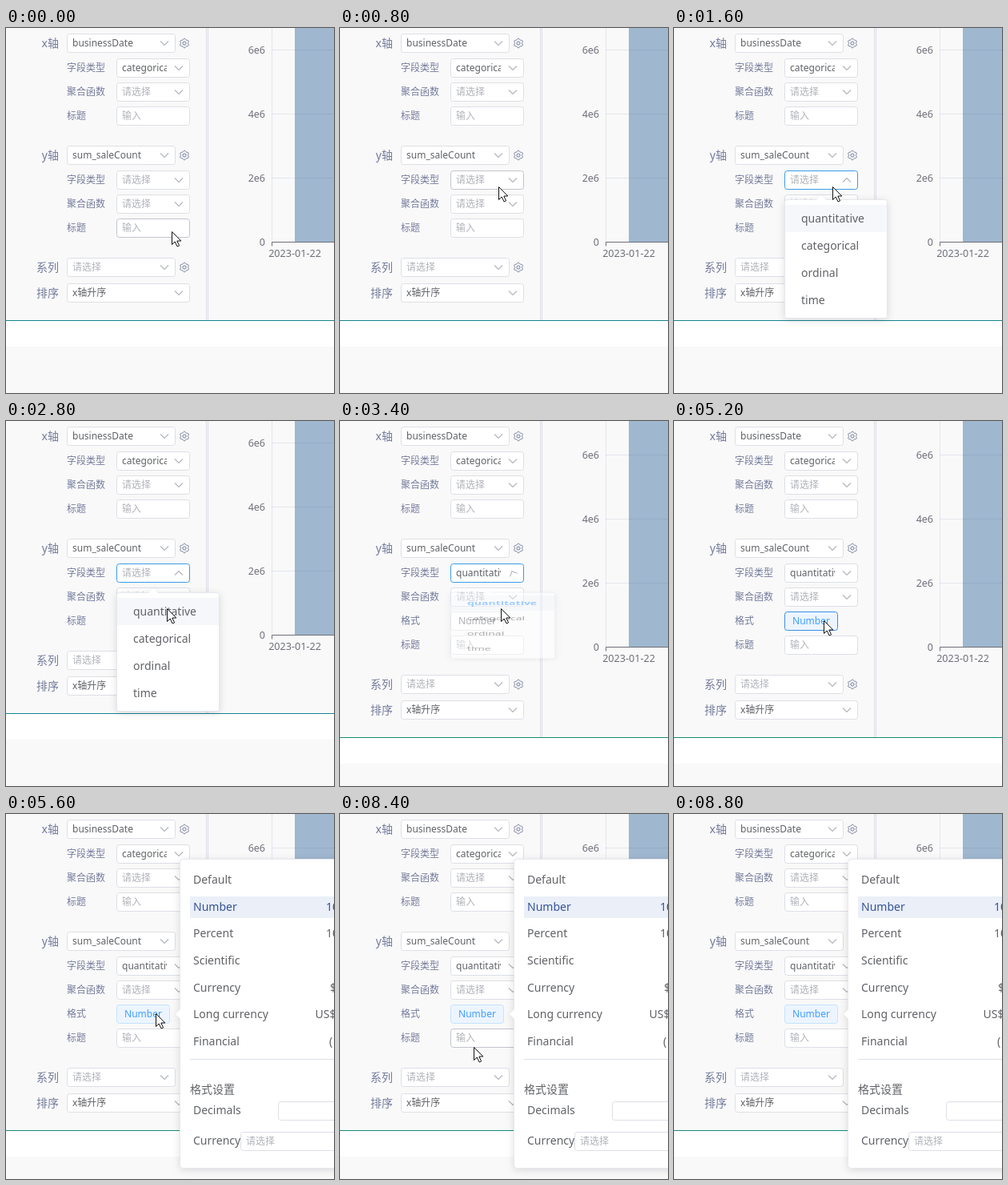
Recreate the animation shown at these times as an HTML page. Size 410 px wide and 456 px high, loop 9.4 s.

```html
<!DOCTYPE html>
<html lang="zh-CN">
<head>
<meta charset="utf-8">
<style>
  html, body { margin: 0; width: 100%; height: 100%; overflow: hidden; background: #f9f9f9; }
  svg { display: block; width: 410px; height: 456px; font: 12px "Noto Sans", "Noto Sans CJK SC", "Noto Sans CJK", sans-serif; }
  .popup { filter: drop-shadow(0 2px 5px rgba(0, 0, 0, .13)); }
</style>
</head>
<body>
<svg id="stage" viewBox="0 0 410 456"></svg>
<script>
const LOOP = 9400, STEP = 200;
const LABEL = '#747b9c', VALUE = '#606266', HINT = '#b2b4ba', BORDER = '#dcdfe6', BLUE = '#409eff';
const stage = document.getElementById('stage');

// Pointer moves: start, end, from, to
const moves = [
  [0, 800, [207, 254], [198, 198]],
  [2000, 2800, [198, 198], [201, 234]],
  [4000, 5000, [201, 234], [187, 249]],
  [8200, 8800, [187, 249], [110, 411]]
];

function pointerAt(t) {
  const [start, end, from, to] = moves.filter(m => t >= m[0]).pop();
  const k = Math.min(1, (t - start) / (end - start));
  const eased = k * k * (3 - 2 * k);
  return from.map((v, i) => v + (to[i] - v) * eased);
}

const rect = (x, y, w, h, fill, extra = '') =>
  `<rect x="${x}" y="${y}" width="${w}" height="${h}" fill="${fill}" ${extra}/>`;
const line = (x1, y1, x2, y2, color) =>
  `<path d="M${x1} ${y1}L${x2} ${y2}" stroke="${color}" fill="none"/>`;
// Text centred vertically on y
const text = (x, y, content, color, size = 12, extra = '') =>
  `<text x="${x}" y="${y + size * .36}" fill="${color}" font-size="${size}" ${extra}>${content}</text>`;
const box = (left, right, y, border, fill = '#fff') =>
  rect(left + .5, y - 11.5, right - left - 1, 23, fill, `rx="3" stroke="${border}"`);
const chevron = (x, y, angle = 0) =>
  `<path d="M-5-2.5L0 2.5L5-2.5" transform="translate(${x} ${y}) rotate(${angle})" fill="none" stroke="#b0b4bc" stroke-width="1.1"/>`;

function gear(y) {
  const points = Array.from({ length: 48 }, (_, i) => {
    const a = i * Math.PI / 24, r = 5.2 + .7 * Math.cos(6 * a);
    return `${(223 + r * Math.sin(a)).toFixed(2)},${(y + r * Math.cos(a)).toFixed(2)}`;
  });
  return `<g fill="none" stroke="${LABEL}"><polygon points="${points.join(' ')}"/><circle cx="223" cy="${y}" r="2.1"/></g>`;
}

function form(t, shift, [px, py]) {
  const hovered = (left, right, y) => px >= left && px < right && Math.abs(py - y) < 12;
  const border = (left, right, y) => hovered(left, right, y) ? '#c0c4cc' : BORDER;
  const heading = (y, label) => text(66, y, label, LABEL, 14, 'text-anchor="end"');
  const wide = (y, label, value, color, right = 212) =>
    heading(y, label) + box(76, right, y, border(76, right, y)) +
    text(83, y, value, color) + chevron(right - 14, y) + (right === 212 ? gear(y) : '');
  const small = (y, label, value, { color = HINT, edge = border(138, 230, y), angle = 0, arrow = true } = {}) =>
    text(76, y, label, LABEL) + box(138, 230, y, edge) +
    text(145, y, value, color, 12, 'clip-path="url(#valueClip)"') + (arrow ? chevron(216, y, angle) : '');

  const chosen = t >= 3200;
  const turn = t < 1400 || t >= 3600 ? 0 : t === 1400 ? 120 : t === 3200 ? 165 : t === 3400 ? 155 : 180;
  const typeField = { color: chosen ? VALUE : HINT, angle: turn };
  if (t >= 1400 && t < 5200) typeField.edge = '#3a9be6';

  let out = wide(19, 'x轴', 'businessDate', VALUE) +
    small(50, '字段类型', 'categorical', { color: VALUE }) +
    small(80, '聚合函数', '请选择') +
    small(110, '标题', '输入', { arrow: false }) +
    wide(159, 'y轴', 'sum_saleCount', VALUE) +
    small(190, '字段类型', chosen ? 'quantitative' : '请选择', typeField) +
    small(220, '聚合函数', '请选择');
  if (chosen) {
    const active = t >= 5200 || hovered(138, 205, 250);
    const edge = t === 5200 ? '#3a8ee6' : active ? '#c6e2ff' : BORDER;
    out += text(76, 250, '格式', LABEL) + box(138, 205, 250, edge, active ? '#ecf5ff' : '#fff') +
      text(171.5, 250, 'Number', active ? BLUE : VALUE, 12, 'text-anchor="middle"');
  }
  return out + small(250 + shift, '标题', '输入', { arrow: false }) +
    wide(299 + shift, '系列', '请选择', HINT) +
    wide(331 + shift, '排序', 'x轴升序', VALUE, 230);
}

function chart(offset) {
  let out = rect(361, 0, 49, 267.5 + offset, '#a0b7d0') +
    line(332.5, 0, 332.5, 267 + offset, '#e4e6ee');
  ['6e6', '4e6', '2e6', '0'].forEach((label, i) => {
    const y = 27.5 + 80 * i + offset;
    if (i < 3) out += line(332, y, 410, y, 'rgba(80,100,150,.13)');
    out += text(324, y, label, '#6e7079', 12.5, 'text-anchor="end"');
  });
  return out + `<path d="M410 ${267.5 + offset}H332.5v5" fill="none" stroke="#6e7079"/>` +
    text(361, 281 + offset, '2023-01-22', '#6e7079', 12.6, 'text-anchor="middle"');
}

function dropdown(t) {
  if (t < 1400 || t >= 3600) return '';
  const [scale, opacity] = { 1400: [.7, .7], 3200: [.93, .9], 3400: [.557, .5] }[t] || [1, 1];
  const chosen = t >= 3200, width = chosen ? 131 : 129;
  const options = ['quantitative', 'categorical', 'ordinal', 'time'].map((name, i) =>
    text(159, 238 + 34 * i, name, chosen && !i ? BLUE : VALUE, 14, chosen && !i ? 'font-weight="700"' : ''));
  return `<g class="popup" opacity="${opacity}" transform="translate(0 214) scale(1 ${scale}) translate(0 -214)">` +
    rect(138.5, 214.5, width - 1, 148, '#fff', 'rx="3" stroke="#e4e7ed"') +
    '<path d="M178 215l6-6 6 6z" fill="#fff"/>' +
    rect(139, 221, width - 2, 34, '#f5f7fa') + options.join('') + '</g>';
}

function formatPanel(t) {
  if (t < 5400) return '';
  const formats = [
    ['Default'], ['Number', '10', 400], ['Percent', '10', 400], ['Scientific'],
    ['Currency', '$', 405], ['Long currency', 'US$', 386.5], ['Financial', '(', 404]
  ];
  const rows = formats.map(([name, sample, x], i) => {
    const y = Math.round(82 + 33.65 * i), color = i === 1 ? '#34549b' : VALUE;
    return text(234, y, name, color, 14) + (sample ? text(x, y, sample, color, 14) : '');
  });
  return `<g class="popup" opacity="${t === 5400 ? .5 : 1}">` +
    rect(217.5, 56.5, 230, 386, '#fff', 'rx="4" stroke="#e6e9f0"') +
    '<path d="M218 244l-6 6 6 6z" fill="#fff"/>' +
    rect(230, 103, 180, 27, '#eaeff8') + rows.join('') +
    line(230, 306.5, 410, 306.5, BORDER) +
    text(230, 344, '格式设置', VALUE, 14) +
    text(234, 370, 'Decimals', VALUE, 14) + box(340, 430, 371, BORDER) +
    text(234, 408, 'Currency', VALUE, 14) + box(293, 430, 409, BORDER) +
    text(300, 409, '请选择', HINT) + '</g>';
}

function render(t) {
  const shift = t >= 3200 ? 30 : 0, edge = 365 + shift;
  const pointer = pointerAt(t);
  const cursor = t >= 8800 ? '' :
    `<path d="M.5.5v16l3.7-3.5 2.9 6 2.5-1.1-2.8-5.9h5z" transform="translate(${pointer})" fill="#fff" stroke="#111"/>`;
  stage.innerHTML =
    '<clipPath id="valueClip"><rect x="139" width="62" height="456"/></clipPath>' +
    rect(0, 0, 410, 456, '#f9f9f9') + rect(0, edge, 410, 33, '#fff') +
    chart(shift / 2) +
    line(250.5, 0, 250.5, edge, '#dcdde8') + line(252.5, 0, 252.5, edge, '#dcdde8') +
    line(0, edge + .5, 410, edge + .5, shift ? '#168a70' : '#14828f') +
    form(t, shift, pointer) + dropdown(t) + formatPanel(t) + cursor;
}

let shown = -1;
function tick() {
  const t = Math.floor(performance.now() % LOOP / STEP) * STEP;
  if (t !== shown) render(shown = t);
  requestAnimationFrame(tick);
}
tick();
</script>
</body>
</html>
```
